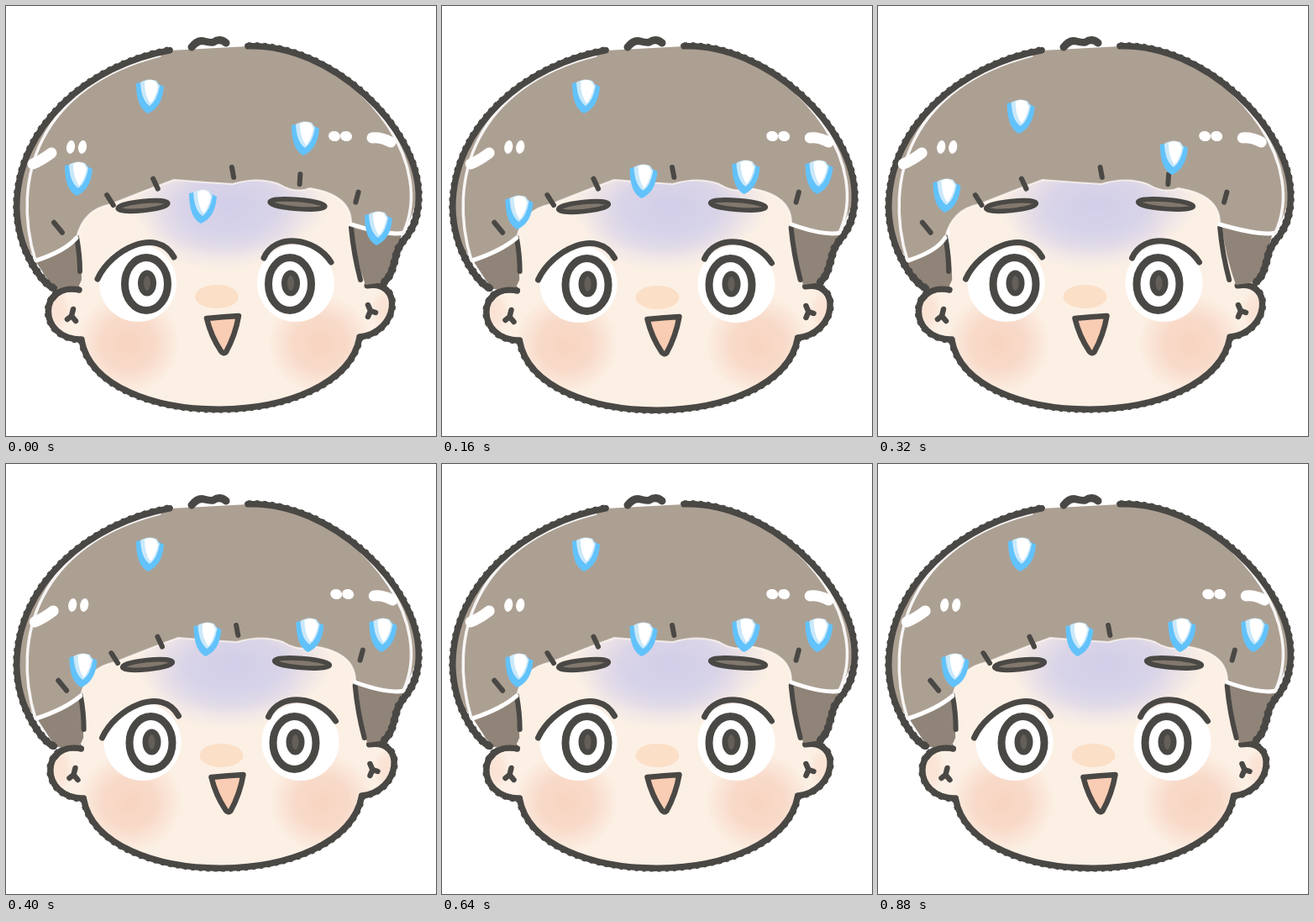
An HTML page with a canvas that plays this animation: 512x512 px, repeating every 0.96 s.

```html
<!DOCTYPE html>
<html lang="en">
<head>
<meta charset="utf-8">
<title>Nervous face</title>
<style>
html, body { margin: 0; width: 100%; height: 100%; overflow: hidden; background: #fff; }
canvas { display: block; width: 512px; height: 512px; }
</style>
</head>
<body>
<canvas id="stage" width="512" height="512"></canvas>
<script>
const ctx = document.getElementById('stage').getContext('2d');
const STEP = 80;
const SWAY = [0, -4.5, 5.5];
const INK = '#4a4845', HAIR = '#aca093', SIDE = '#908478', SKIN = '#fcf0e5', BLUE = '#62c2fb';

const JAW = 'M90 397C110 509 400 507 421 394';
const LEFT_EAR = 'M87 338C40 328 36 396 90 397';
const RIGHT_EAR = 'M430 333C473 326 468 388 421 394';
const HAIR_LEFT = 'M57 336C42 330 14 290 13 240C13 142 100 70 195 53';
const HAIR_RIGHT = 'M288 48C385 44 494 145 491 230C490 272 470 275 465 295S458 322 450 329';

// Each drop falls for `life` steps from the step it is born in; `again` refills the gap.
const DROPS = [
  { x: 155, y: 88, fall: 24, born: 0, life: 2, again: true },
  { x: 340, y: 138, fall: 23, born: 0, life: 3 },
  { x: 70, y: 186, fall: 20, born: 0, life: 3 },
  { x: 218, y: 189, fall: 30, born: 2, life: 2 },
  { x: 427, y: 184, fall: 61, born: 2, life: 2 }
];

const shape = d => new Path2D(d);

function line(path, width, color = INK) {
  ctx.lineWidth = width;
  ctx.strokeStyle = color;
  ctx.stroke(path);
}

function fill(path, color) {
  ctx.fillStyle = color;
  ctx.fill(path);
}

function oval(x, y, rx, ry, angle = 0) {
  const path = new Path2D();
  path.ellipse(x, y, rx, ry, angle, 0, Math.PI * 2);
  return path;
}

function shifted(dx, dy, draw) {
  ctx.save();
  ctx.translate(dx, dy);
  draw();
  ctx.restore();
}

function glow(x, y, rx, ry, rgb, alpha, core) {
  shifted(x, y, () => {
    ctx.scale(rx, ry);
    const g = ctx.createRadialGradient(0, 0, 0, 0, 0, 1);
    g.addColorStop(0, `rgba(${rgb},${alpha})`);
    g.addColorStop(core, `rgba(${rgb},${alpha * 0.8})`);
    g.addColorStop(1, `rgba(${rgb},0)`);
    ctx.fillStyle = g;
    ctx.fillRect(-1, -1, 2, 2);
  });
}

// Outline with a slightly ragged rim.
function roughLine(path, width) {
  ctx.save();
  ctx.lineCap = 'butt';
  ctx.setLineDash([4, 5]);
  line(path, width + 1.5);
  ctx.restore();
  line(path, width);
}

function drawHead(dx) {
  const head = shape(JAW + 'C468 388 473 326 430 333L425 200H87V338C40 328 36 396 90 397Z');
  const edges = [JAW, LEFT_EAR, RIGHT_EAR].map(shape);
  edges.forEach(edge => roughLine(edge, 8));
  fill(head, SKIN);

  ctx.save();
  ctx.clip(head);
  for (const x of [60, 452]) glow(x, 362, 18, 27, '249,216,199', 0.6, 0.5);
  for (const x of [145, 374]) glow(x, 402, 63, 60, '246,203,182', 0.75, 0.5);
  shifted(dx * 0.6, 0, () => {
    glow(266, 236, 118, 62, '205,202,232', 0.9, 0.5);
    glow(258, 268, 95, 46, '211,208,235', 0.6, 0.45);
  });
  ctx.restore();

  edges.forEach(edge => line(edge, 7));
  line(shape('M80 361L78 369L73 373M78 369L83 375M431 356L434 363L431 370M434 363L440 365'), 6.5);
}

function drawSideburns(dx) {
  shifted(dx * 0.4, 0, () => {
    fill(shape('M34 302L62 289L84 272Q90 300 90 326L85 337H57Z'), SIDE);
    fill(shape('M411 260L472 269L461 309L450 329L428 332Q416 300 411 260Z'), SIDE);
  });
  shifted(dx * 0.85, 0, () => line(shape('M84 275Q88 296 88 316M411 264Q414 296 422 326'), 6));
}

function drawHair(dx) {
  const at = x => x + dx * 0.9;
  const rightHem = `474 270Q455 274 ${at(411)} 260`;
  const hem = `Q${at(412)} 225 ${at(362)} 217Q${at(345)} 224 ${at(325)} 212Q${at(300)} 203 ${at(270)} 212`
    + `Q${at(235)} 210 ${at(200)} 207Q${at(165)} 220 ${at(125)} 236Q${at(92)} 242 ${at(84)} 276`;
  const leftHem = 'Q70 292 36 303';
  const left = shape(HAIR_LEFT), right = shape(HAIR_RIGHT);

  roughLine(left, 8);
  roughLine(right, 8);
  fill(shape(`M36 303Q14 275 13 240C13 142 100 70 195 53L288 48C385 44 494 145 491 230L${rightHem}${hem}${leftHem}Z`), HAIR);
  line(shape(`M${at(411)} 260${hem}`), 2, 'rgba(255,250,246,.75)');
  line(shape(`M${rightHem}M${at(84)} 276${leftHem}`), 5, '#fff');
  line(shape('M35 303C5 205 40 95 183 59M347 58C432 85 510 190 473 270'), 3.5, '#f7f5f4');
  line(left, 7);
  line(right, 7);
  line(shape('M221 49Q228 40 236 42T247 43Q255 38 262 44'), 9);

  shifted(dx * 0.4, 0, () => {
    for (const x of [77, 91]) fill(oval(x, 168, 5, 8, 0.15), '#fff');
    for (const x of [391, 405]) fill(oval(x, 155, 7, 6, 0.2), '#fff');
    line(shape('M32 188Q42 184 54 175M436 157Q446 156 458 162'), 13, '#fff');
  });

  // Loose strands fan out along the fringe.
  shifted(dx * 0.95, 0, () => {
    for (const x of [62, 124, 178, 270, 350, 418]) {
      const y = 198 + 0.00145 * (x - 275) ** 2, lean = (330 - x) / 54;
      line(shape(`M${x - lean} ${y - 6}L${x + lean} ${y + 6}`), 6);
    }
  });
}

function drawEye(x, whiteX, lash) {
  fill(oval(whiteX, 330, 46, 46), '#fff');
  line(oval(x, 331, 25.5, 31.5), 9);
  fill(oval(x + 1, 330, 11, 15.5), INK);
  fill(oval(x + 1, 330, 4, 9), '#655f59');
  line(shape(lash), 7);
}

function drawBrow(x, y, rx, angle) {
  const brow = oval(x, y, rx, 5.5, angle);
  fill(brow, '#82786d');
  line(brow, 5.5);
}

function drawFeatures() {
  drawEye(167, 157, 'M109 325C125 290 180 262 200 299');
  drawEye(338, 345, 'M307 300C320 270 368 275 387 305');
  drawBrow(163, 238, 30, -0.1);
  drawBrow(347, 236, 33, 0.08);
  fill(oval(251, 346, 26, 14), '#fbdfc7');
  const mouth = shape('M239 372Q259 370 277 369Q273 392 262 412Q259 415 256 411Q244 393 239 372Z');
  fill(mouth, '#f9cdb3');
  line(mouth, 6.5);
}

function drawDrop({ x, y, fall, born, life, again }, phase, dx) {
  const age = (phase - born + SWAY.length) % SWAY.length;
  if (age >= life && !again) return;
  const top = y + fall * (age % life);
  const follow = Math.min(1, (top - 88) / 80);
  shifted(x + dx * follow, top, () => {
    fill(shape('M0 4Q0 33 14 40Q31 33 33 8L27 5L5 3Z'), BLUE);
    fill(shape('M5 3Q14 -3 24 1L28 7Q25 25 16 31Q6 24 5 3Z'), '#c9e8fa');
    fill(shape('M10 2Q17 -2 23 2L26 8Q23 22 17 28Q10 18 10 2Z'), '#fff');
  });
}

function draw(now) {
  const phase = Math.floor(now / STEP) % SWAY.length;
  const dx = SWAY[phase], dy = dx > 0 ? 1 : 0;
  ctx.fillStyle = '#fff';
  ctx.fillRect(0, 0, 512, 512);
  ctx.lineCap = ctx.lineJoin = 'round';
  shifted(dx * 0.45, dy, () => drawHead(dx));
  drawSideburns(dx);
  drawHair(dx);
  shifted(dx * 0.45, dy, () => line(shape('M87 338Q66 334 56 348'), 7));
  shifted(dx, dy, drawFeatures);
  DROPS.forEach(drop => drawDrop(drop, phase, dx));
}

const start = performance.now();
function tick() {
  draw(performance.now() - start);
  requestAnimationFrame(tick);
}
tick();
</script>
</body>
</html>
```
